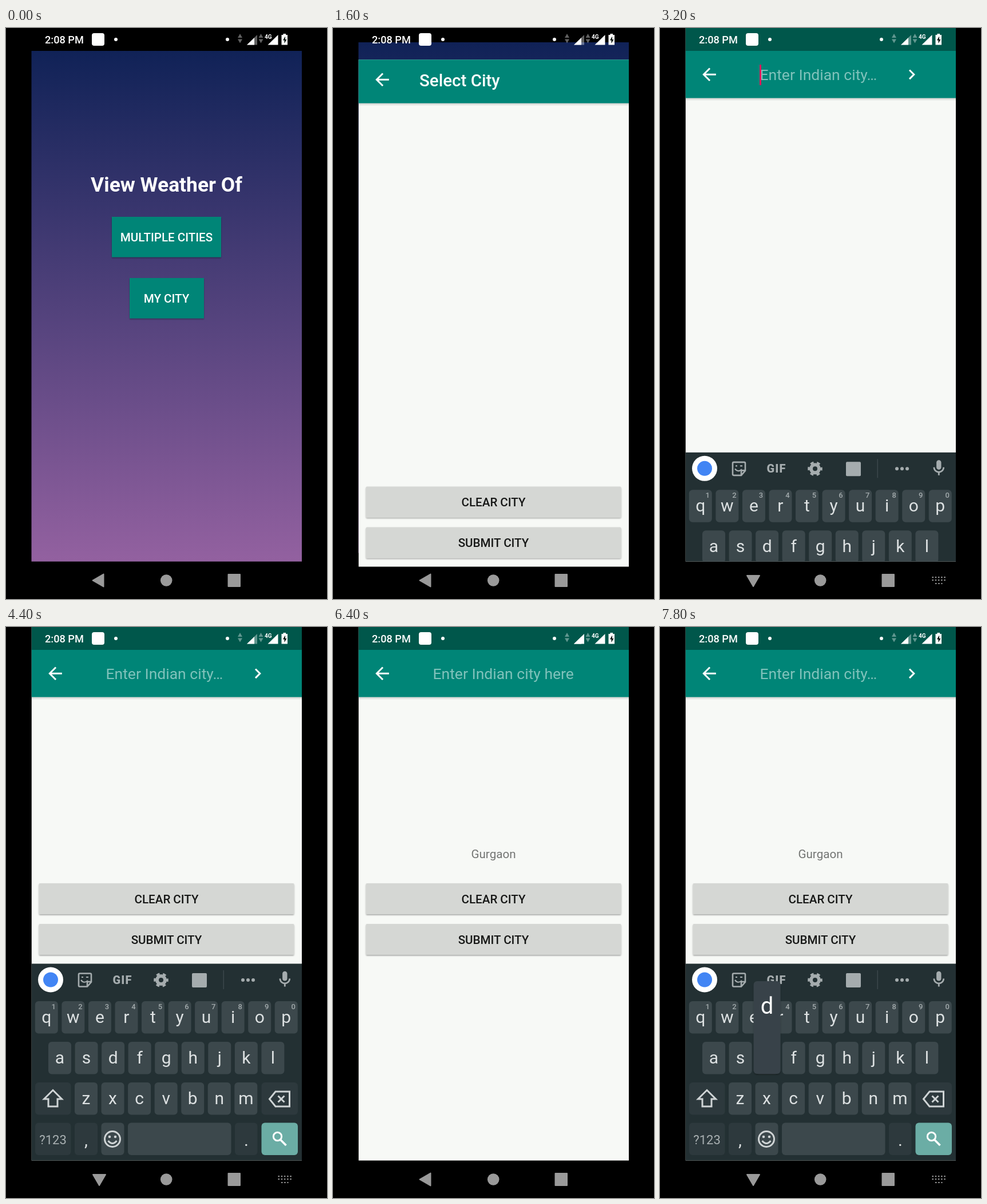
Write an HTML page that moves like this. It is 561 by 998 pixels and loops after 8000 ms.

```html
<!DOCTYPE html>
<html lang="en">
<head>
<meta charset="utf-8">
<title>City weather app</title>
<style>
  html, body { margin: 0; width: 100%; height: 100%; overflow: hidden; background: #000; }
  svg { display: block; width: 100vw; height: 100vh; }
  text { font-family: Roboto, "Open Sans", sans-serif; white-space: pre; }
  .mid { text-anchor: middle; }
  .btn { font-size: 20.6px; font-weight: 500; text-anchor: middle; }
  .item { font-size: 20.6px; fill: #737573; }
  .query { font-size: 26.5px; fill: #fff; }
  .hint { fill-opacity: .5; }
  .typed { text-decoration: underline; text-decoration-skip-ink: none; }
  .key { font-size: 30px; fill: #dde1e2; text-anchor: middle; }
  .digit { font-size: 13px; font-weight: 500; fill: #a3abad; text-anchor: middle; }
  .word { font-size: 26px; fill: #d3d8d9; text-anchor: middle; }
  .line { fill: none; stroke: #cfd4d5; stroke-width: 3; }
  .tool { fill: #a5acae; }
</style>
</head>
<body>
<svg viewBox="0 0 561 998" preserveAspectRatio="none">
  <defs>
    <linearGradient id="dusk" x2="0" y2="1">
      <stop offset="0" stop-color="#102257"/>
      <stop offset="1" stop-color="#9361a0"/>
    </linearGradient>
    <linearGradient id="fade" x2="0" y2="1">
      <stop offset="0" stop-opacity=".16"/>
      <stop offset="1" stop-opacity="0"/>
    </linearGradient>
    <filter id="lift" x="-10%" y="-20%" width="120%" height="150%">
      <feDropShadow dx="0" dy="1.5" stdDeviation="1.3" flood-opacity=".35"/>
    </filter>
    <clipPath id="reveal"><rect id="revealBox" x="44.5" width="472.5" height="998"/></clipPath>
    <clipPath id="above"><rect x="44.5" width="472.5" height="932.5"/></clipPath>
  </defs>

  <g id="home">
    <rect x="44.5" y="40" width="472.5" height="892.5" fill="url(#dusk)"/>
    <text class="mid" x="280.5" y="286" font-size="35.4" font-weight="700" fill="#fff">View Weather Of</text>
    <g fill="#008577" filter="url(#lift)">
      <rect x="185" y="330" width="191" height="70.5"/>
      <rect x="216" y="437" width="130" height="70.5"/>
    </g>
    <rect id="pressed" x="185" y="330" width="191" height="70.5" fill="#fff" fill-opacity=".15"/>
    <g fill="#fff">
      <text class="btn" x="280.5" y="373">MULTIPLE CITIES</text>
      <text class="btn" x="280.5" y="480">MY CITY</text>
    </g>
  </g>

  <g id="app">
    <g clip-path="url(#reveal)">
      <rect x="44.5" width="472.5" height="932.5" fill="#f7f9f6"/>
      <rect x="44.5" width="472.5" height="40" fill="#00574b"/>
      <rect x="44.5" y="40" width="472.5" height="82.5" fill="#008577"/>
      <rect x="44.5" y="122.5" width="472.5" height="5" fill="url(#fade)"/>
      <g fill="#fff">
        <path transform="translate(68.3 63.6) scale(1.475)" d="M20 11H7.83l5.59-5.59L12 4l-8 8 8 8 1.41-1.41L7.83 13H20z"/>
        <path id="go" transform="translate(422.3 63.6) scale(1.475)" d="M10 6L8.59 7.41 13.17 12l-4.58 4.59L10 18l6-6z"/>
        <path id="wipe" transform="translate(351.3 63.6) scale(1.475)" d="M19 6.41L17.59 5 12 10.59 6.41 5 5 6.41 10.59 12 5 17.59 6.41 19 12 13.41 17.59 19 19 17.59 13.41 12z"/>
        <text id="title" x="151" y="92.5" font-size="29.5" font-weight="500">Select City</text>
      </g>
      <text id="query" class="query" x="174.5" y="91"></text>
      <rect id="caret" x="174" y="64" width="3" height="36" fill="#e0195c"/>
      <g id="list"></g>
      <g id="body">
        <text id="chosen" class="item mid" x="280.5" y="748">Gurgaon</text>
        <g fill="#d5d7d4" filter="url(#lift)">
          <rect x="57.5" y="792.5" width="446" height="54" rx="2"/>
          <rect x="57.5" y="863.5" width="446" height="54" rx="2"/>
        </g>
        <g fill="#171817">
          <text class="btn" x="280.5" y="827">CLEAR CITY</text>
          <text class="btn" x="280.5" y="898">SUBMIT CITY</text>
        </g>
      </g>
    </g>
  </g>

  <g clip-path="url(#above)">
    <g id="board">
      <rect x="44.5" y="588.5" width="472.5" height="345" fill="#233033"/>
      <circle cx="78" cy="616.5" r="22" fill="#fff"/>
      <circle cx="78" cy="616.5" r="13" fill="#4285f4"/>
      <path class="tool" transform="translate(470.5 599) scale(1.4)" d="M12 14c1.66 0 3-1.34 3-3V5c0-1.66-1.34-3-3-3S9 3.34 9 5v6c0 1.66 1.34 3 3 3zm5-3c0 2.76-2.24 5-5 5s-5-2.24-5-5H5c0 3.53 2.61 6.43 6 6.92V21h2v-3.08c3.39-.49 6-3.39 6-6.92z"/>
      <g id="tools">
        <g fill="none" stroke="#a5acae" stroke-width="2.6">
          <path d="M129 605.500h18q2 0 2 2v13l-7 8h-13q-2 0-2-2v-19q0-2 2-2zM149 620h-5q-2 0-2 2v6"/>
          <path d="M131 617q5 7 12 1M132 612h3M140 612h4" stroke-width="2.2"/>
        </g>
        <text class="tool mid" x="203.500" y="624" font-size="20" font-weight="900" letter-spacing="1.2">GIF</text>
        <g fill="none" stroke="#a5acae">
          <circle cx="271" cy="617" r="7" stroke-width="6"/>
          <circle cx="271" cy="617" r="10.8" stroke-width="4" stroke-dasharray="5.65" stroke-dashoffset="2.8"/>
        </g>
        <rect class="tool" x="325" y="605" width="26" height="25" rx="2"/>
        <rect x="379.500" y="600" width="1.500" height="33" fill="#3b474b"/>
        <g class="tool"><circle cx="414" cy="617" r="3"/><circle cx="423" cy="617" r="3"/><circle cx="432" cy="617" r="3"/></g>
      </g>
      <g id="words">
        <path d="M215 599v35M344 599v35" stroke="#3b474b" stroke-width="1.5"/>
        <text id="word0" class="word" x="157" y="627"></text>
        <text id="word1" class="word" x="279" y="627"></text>
        <text id="word2" class="word" x="401" y="627"></text>
      </g>
      <g id="keys"></g>
      <path class="line" d="M82 809.5L97.500 825H90V838H74V825H66.500Z"/>
      <path class="line" d="M471 812H495.500V838H471L460.500 825ZM475.500 819.500l11 11M486.500 819.500l-11 11"/>
      <circle class="line" cx="186" cy="895" r="13.500"/>
      <path class="line" d="M178.500 898q7.500 9 15 0" stroke-width="2.500"/>
      <circle cx="181" cy="891" r="2.300" fill="#cfd4d5"/><circle cx="191" cy="891" r="2.300" fill="#cfd4d5"/>
      <path d="M479.500 896l10 10" stroke="#fff" stroke-width="3.600"/>
      <circle cx="474.500" cy="890.500" r="7.200" fill="none" stroke="#fff" stroke-width="3"/>
      <g id="popup">
        <rect x="-23.500" y="-106" width="47" height="162" rx="6" fill="#374348" filter="url(#lift)"/>
        <text id="popupChar" class="mid" y="-49" font-size="40" fill="#fff"></text>
      </g>
    </g>
  </g>

  <g fill="#9a9a9a" stroke="#9a9a9a" stroke-linejoin="round">
    <path id="back" d="M151.500 965.500L170.500 954.500V976.500Z" stroke-width="2"/>
    <path id="hide" d="M152 957H174L163 976Z" stroke-width="2"/>
    <circle cx="280.200" cy="965.500" r="10.300" stroke="none"/>
    <rect x="388.500" y="955" width="20.500" height="21" stroke-width="2"/>
    <path id="switch" d="M475.500 960H499M475.500 965H499M481 971H493.500" stroke-width="2.200" stroke-dasharray="2.500 2.700"/>
  </g>

  <g fill="#fff">
    <text x="68" y="26.500" font-size="18.200" font-weight="500">2:08 PM</text>
    <rect x="150" y="9" width="22" height="22" rx="4"/>
    <circle cx="192" cy="20" r="3"/>
    <circle cx="387" cy="20" r="3"/>
    <path fill-opacity=".38" d="M409 10l4 7h-8zM409 26.500l4-7h-8zM445.500 10l4 7h-8zM445.500 26.500l4-7h-8z"/>
    <path id="bars" d="M421 29.500L439 12V29.500Z" fill-opacity=".38"/>
    <path d="M421 29.500L434 16.900V29.500Z"/>
    <path d="M457.500 29.500L475.500 12V29.500Z"/>
    <text x="452" y="18.500" font-size="10" font-weight="700">4G</text>
    <path d="M484.500 10h4.500v2h3v17.500h-10.500v-17.500h3z"/>
    <path d="M488 14.500l-4 7h2.500v5.500l4-7h-2.500z" fill="#06130f"/>
  </g>
</svg>

<script>
const LOOP = 8000, TICK = 200;
const $ = id => document.getElementById(id);
const show = (id, on) => $(id).setAttribute('visibility', on ? 'inherit' : 'hidden');
const move = (id, x, y) => $(id).setAttribute('transform', `translate(${x} ${y})`);
const within = (t, ...spans) => spans.some(([a, b]) => t >= a && t < b);
const clamp = v => Math.min(1, Math.max(0, v));

const cities = ['Gurgaon', 'Gurgaon', 'Guruvayur', 'Gurpur', 'Guru Har Sahai'];
$('list').innerHTML = '<rect id="picked" x="52" y="130" width="457" height="58" fill-opacity=".07"/>' +
  cities.map((name, i) => `<text class="item" x="66.5" y="${167 + i * 58.6}">${name}</text>` +
    (i < 4 ? `<rect x="52" y="${187.2 + i * 58.6}" width="457" height="1.5" fill="#d8dad7"/>` : '')).join('');

// Key centres are kept so a popup can be placed over any letter.
const spots = {};
const cap = (x, y, w, fill = '#3c484c') => `<rect x="${x}" y="${y}" width="${w}" height="56.500" rx="6" fill="${fill}"/>`;
let keys = '';
[['qwertyuiop', 70.8], ['asdfghjkl', 94], ['zxcvbnm', 140]].forEach(([row, start], r) => {
  [...row].forEach((ch, i) => {
    const x = start + i * 46.55, y = 654 + r * 71;
    spots[ch] = [x, y];
    keys += cap(x - 20, y, 40) + `<text class="key" x="${x}" y="${y + 37.5}">${ch}</text>`;
    if (!r) keys += `<text class="digit" x="${x + 12.5}" y="${y + 14}">${(i + 1) % 10}</text>`;
  });
});
const dark = '#2d393d';
keys += cap(51, 796, 62.5, dark) + cap(446.5, 796, 63.5, dark) + cap(51, 866.5, 62.5, dark) +
  cap(120, 866.5, 40, dark) + cap(166.500, 866.5, 40) + cap(213, 866.5, 180.5) +
  cap(400, 866.5, 39.5, dark) + cap(446.5, 866.5, 63.5, '#6bada5') +
  '<text class="mid" x="82" y="904" font-size="22" fill="#a9b0b2">?123</text>' +
  '<text class="key" x="140" y="907">,</text><text class="key" x="420" y="907">.</text>';
$('keys').innerHTML = keys;

const popups = { 4600: 'g', 4800: 'u', 5000: 'r', 7800: 'd' };
const rise = (t, start) => 1 - (1 - clamp((t - start) / 600)) ** 2;

function boardLevel(t) {
  if (t >= 7000) return rise(t, 7000);
  if (t >= 6200) return t < 6400 ? .45 : 0;
  return rise(t, 3000);
}

function render(t) {
  // Screen change: the new screen settles upwards while its top edge is revealed.
  const k = t < 1400 ? 0 : t < 2000 ? 1 - Math.exp((1400 - t) / 132) : 1;
  show('pressed', t === 1400);
  show('home', k < 1);
  move('home', 0, -19.2 * k);
  show('app', k > 0);
  move('app', 0, 41 * (1 - k));
  $('revealBox').setAttribute('y', t < 1800 ? 210 * (1 - k) : 0);

  const focus = within(t, [2800, 6200], [7000, LOOP]);
  const typed = within(t, [4800, 6200]) ? 'gur'.slice(0, (t - 4600) / TICK) : '';
  const searching = t >= 1800;
  show('title', !searching);
  show('query', searching);
  $('query').setAttribute('class', 'query ' + (typed ? 'typed' : 'hint'));
  $('query').textContent = typed || (focus ? 'Enter Indian city…' : 'Enter Indian city here');
  show('go', focus);
  show('wipe', typed);
  show('caret', within(t, [2800, 3400], [3800, 4400], [4600, 5600], [5800, 6200], [7000, 7600]));
  $('caret').setAttribute('x', typed ? 175 + $('query').getComputedTextLength() : 174);

  show('list', within(t, [5200, 6200]));
  show('picked', within(t, [5800, 6200]));
  show('chosen', t >= 6200);
  move('body', 0, within(t, [3400, 6600], [7400, LOOP]) ? -344.5 : 0);

  const level = boardLevel(t);
  show('board', level > 0);
  move('board', 0, 345 * (1 - level));
  show('back', !level);
  show('hide', level);
  show('switch', level);
  show('tools', !typed);
  show('words', typed);
  $('word0').textContent = typed;
  $('word1').textContent = typed && typed[0].toUpperCase() + typed.slice(1);
  $('word2').textContent = typed === 'gur' ? 'fir' : '';

  const ch = popups[t];
  show('popup', ch);
  if (ch) {
    move('popup', ...spots[ch]);
    $('popupChar').textContent = ch;
  }
  $('bars').setAttribute('fill-opacity', within(t, [6200, 7000]) ? 1 : .38);
}

function frame() {
  render(Math.floor(performance.now() % LOOP / TICK) * TICK);
  requestAnimationFrame(frame);
}
frame();
</script>
</body>
</html>
```
